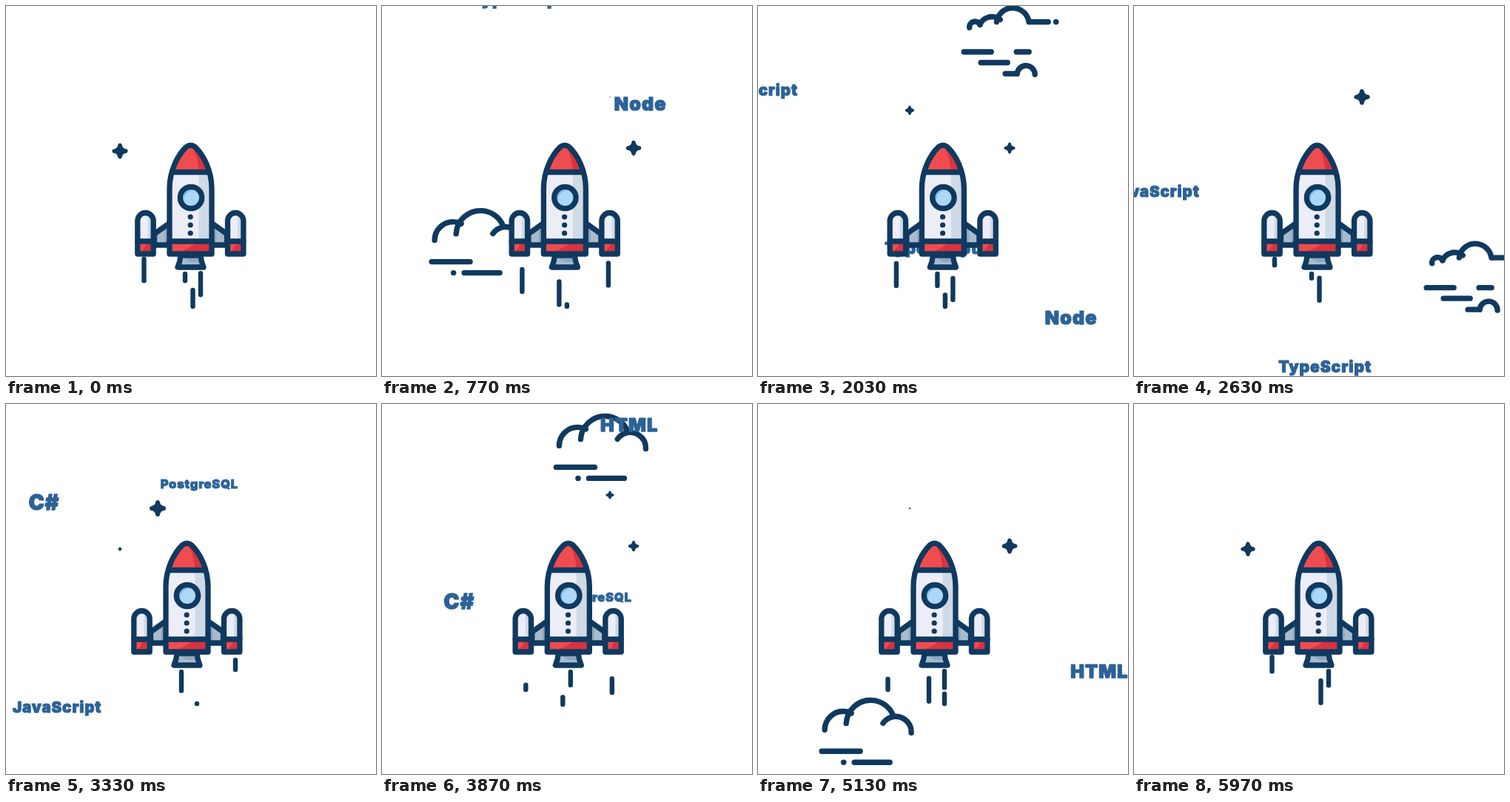
An HTML page with a canvas for the animation above (6010 ms loop, 500x500 px).

```html
<!DOCTYPE html>
<html lang="en">
<head>
<meta charset="utf-8">
<title>Rocket</title>
<style>
html, body { margin: 0; width: 100%; height: 100%; overflow: hidden; background: #fff; }
canvas { display: block; width: 500px; height: 500px; }
</style>
</head>
<body>
<canvas id="stage"></canvas>
<script>
const LOOP = 6010;
const PUFF = LOOP / 6;      // exhaust cycle
const TWINKLE = LOOP / 4;   // star cycle
const NAVY = '#10395f', BLUE = '#2c6297', RED = '#f04c4f', DARK_RED = '#d9333f';
const WHITE = '#ecedf7', SHADE = '#cedae6', STEEL = '#a8bbce', DARK_STEEL = '#8fa7be';

const canvas = document.getElementById('stage');
const ratio = window.devicePixelRatio || 1;
canvas.width = canvas.height = 500 * ratio;
const ctx = canvas.getContext('2d');

const mod = (a, n) => ((a % n) + n) % n;

function pen(width, color = NAVY) {
  ctx.lineWidth = width;
  ctx.strokeStyle = color;
  ctx.lineCap = ctx.lineJoin = 'round';
}

function line(x1, y1, x2, y2) {
  ctx.beginPath();
  ctx.moveTo(x1, y1);
  ctx.lineTo(x2, y2);
  ctx.stroke();
}

function dot(x, y) {
  line(x, y, x + 0.1, y);
}

function arc(x, y, r, from, to) {
  ctx.beginPath();
  ctx.arc(x, y, r, from * Math.PI / 180, to * Math.PI / 180);
  ctx.stroke();
}

function disc(x, y, r, color) {
  ctx.beginPath();
  ctx.arc(x, y, r, 0, 7);
  ctx.fillStyle = color;
  ctx.fill();
}

function box(x, y, w, h, color) {
  ctx.fillStyle = color;
  ctx.fillRect(x, y, w, h);
}

function fill(path, color) {
  ctx.fillStyle = color;
  ctx.fill(new Path2D(path));
}

function at(x, y, draw) {
  ctx.save();
  ctx.translate(x, y);
  draw();
  ctx.restore();
}

// paints inside a shape, then strokes its outline
function shape(outline, paint) {
  const path = new Path2D(outline);
  ctx.save();
  ctx.clip(path);
  paint();
  ctx.restore();
  ctx.stroke(path);
}

function bigCloud() {
  arc(29, 41, 25, 180, 296);
  arc(66, 34, 33, 183, 337);
  arc(100, 44, 21, 215, 363);
  line(0, 70, 52, 70);
  dot(29.5, 85);
  line(44, 85, 92, 85);
}

function smallCloud() {
  arc(15, 28, 7.5, 175, 335);
  arc(38, 32, 18, 205, 308);
  arc(66, 24, 22, 188, 352);
  line(89, 21, 114, 21);
  dot(124.5, 21);
  line(0, 61.5, 37, 61.5);
  line(71, 61.5, 88, 61.5);
  line(23, 76, 59, 76);
  line(56, 91, 72, 91);
  arc(84, 92, 12, 185, 360);
}

// the cloud's first line starts at x when its top edge enters the stage
function fallCloud(t, start, x, vx, draw) {
  const age = t - start;
  pen(7.4);
  at(x + vx * age, 0.531 * age, draw);
}

function drawClouds(t) {
  fallCloud(t, 252, 23.5, 0.084, bigCloud);
  fallCloud(t, 2030, 278, 0.195, smallCloud);
  fallCloud(t, 3842, 233, 0.084, bigCloud);
  fallCloud(t, 4379, 23, 0.084, bigCloud);
}

// x is the centre when the baseline enters the stage
function fallWord(t, text, size, start, x, vx, vy) {
  const age = t - start;
  ctx.font = `900 ${size}px Inter, sans-serif`;
  ctx.letterSpacing = size * 0.045 + 'px';
  ctx.textAlign = 'center';
  ctx.fillStyle = BLUE;
  pen(size * 0.05, BLUE);
  ctx.fillText(text, x + vx * age, vy * age);
  ctx.strokeText(text, x + vx * age, vy * age);
}

function drawWords(t) {
  fallWord(t, 'Node', 25, 155, 313, 0.0587, 0.229);
  fallWord(t, 'TypeScript', 21, 776, 184, 0.04, 0.267);
  fallWord(t, 'JavaScript', 20.5, 1500, -37, 0.058, 0.228);
  fallWord(t, 'C#', 28, 2753, -5, 0.098, 0.248);
  fallWord(t, 'PostgreSQL', 16.5, 2927, 243.5, 0.044, 0.283);
  fallWord(t, 'HTML', 25, 3731, 320, 0.101, 0.264);
}

function drawStar(t, x, y, phase) {
  const u = mod(t - phase * TWINKLE, TWINKLE) / 635;
  if (u >= 1) return;
  at(x, y, () => {
    const s = Math.sin(Math.PI * u);
    ctx.scale(s, s);
    pen(6);
    ctx.beginPath();
    ctx.moveTo(8, 0);
    for (let i = 1; i <= 4; i++) {
      const a = i * Math.PI / 2, mid = a - Math.PI / 4;
      ctx.quadraticCurveTo(1.5 * Math.cos(mid), 1.5 * Math.sin(mid), 8 * Math.cos(a), 8 * Math.sin(a));
    }
    ctx.fillStyle = NAVY;
    ctx.fill();
    ctx.stroke();
  });
}

function drawStars(t) {
  drawStar(t, 205, 141, 0.01);
  drawStar(t, 340, 192, 0.25);
  drawStar(t, 308, 123, 0.505);
  drawStar(t, 154, 196, 0.83);
}

// a dash slides down a 50px slot below the engine, once per cycle for each phase
function exhaust(t, x, top, length, ...phases) {
  for (const phase of phases) {
    const head = 0.25 * mod(t - phase * PUFF, PUFF);
    const a = Math.max(head - length, 0) + 3;
    const b = Math.min(head, 50) - 3;
    if (b >= a) line(x, top + a, x, top + b);
  }
}

function drawExhaust(t) {
  pen(6.4);
  exhaust(t, -63, 339, 36, 0.86);
  exhaust(t, -57.5, 339, 36, 0.57);
  exhaust(t, -7.5, 359, 37, 0.2, 0.58, 0.94);
  exhaust(t, 3, 359, 36, 0.46, 0.77);
  exhaust(t, 13.5, 358, 35, 0.01, 0.86);
  exhaust(t, 59, 343, 36, 0.62);
  exhaust(t, 65.5, 343, 24, 0.25);
}

function drawBooster(x) {
  at(x, 0, () => {
    shape('M-10.7 335V290.5a10.7 11 0 0 1 21.4 0V335Z', () => {
      box(-12, 276, 24, 60, WHITE);
      box(3, 276, 9, 60, SHADE);
      box(-12, 318, 24, 18, RED);
      fill('M-8 336L4 318H13V336Z', DARK_RED);
    });
    line(-10.7, 318, 10.7, 318);
  });
}

function drawWing(side) {
  ctx.save();
  ctx.scale(side, 1);
  shape('M28 293L49 308V323H28Z', () => {
    box(25, 290, 26, 35, STEEL);
    box(25, 290, 10, 35, DARK_STEEL);
  });
  ctx.restore();
}

function drawWindow() {
  disc(0.5, 259, 14.5, '#77bdea');
  ctx.save();
  ctx.clip();
  disc(4, 262, 13, '#acd7f7');
  ctx.restore();
  arc(0.5, 259, 14.7, 0, 360);
}

function drawRocket() {
  pen(7.3);
  drawWing(-1);
  drawWing(1);

  shape('M-13.5 337Q-14 345-17.5 353H17.5Q14 345 13.5 337Z', () => {
    box(-20, 335, 40, 20, STEEL);
    fill('M-14 335H14L18 346H2Q-4 346-14 335Z', DARK_STEEL);
  });

  shape('M-28.5 335V247C-28.5 222-17 201-6 190.5Q0 186 6 190.5C17 201 28.5 222 28.5 247V335Z', () => {
    box(-30, 224, 60, 94, WHITE);
    box(11, 224, 20, 94, SHADE);
    box(-30, 184, 60, 40, RED);
    fill('M-1 184Q10 203 11 224H32V184Z', DARK_RED);
    box(-30, 318, 60, 18, RED);
    fill('M-25 336Q-5 330 11 318H30V336Z', DARK_RED);
  });
  line(-24, 224.5, 24, 224.5);
  line(-28.5, 318, 28.5, 318);

  drawWindow();
  for (let i = 0; i < 3; i++) disc(-0.3, 285 + 11 * i, 3.6, NAVY);
  drawBooster(-61);
  drawBooster(60.7);
}

// turning points of the sideways drift: time, x
const turns = [[0, 0], [770, -2.6], [2030, 0.4], [3330, -5], [4330, 8], [5130, -11], [5970, 0], [LOOP, 0]];

function drift(t) {
  const i = turns.findIndex(p => p[0] > t);
  const [t1, x1] = turns[i - 1], [t2, x2] = turns[i];
  return x1 + (x2 - x1) * (1 - Math.cos(Math.PI * (t - t1) / (t2 - t1))) / 2;
}

function draw(t) {
  ctx.setTransform(ratio, 0, 0, ratio, 0, 0);
  box(0, 0, 500, 500, '#fff');
  drawClouds(t);
  drawWords(t);
  drawStars(t);
  at(249.5 + drift(t), 0, () => {
    drawExhaust(t);
    drawRocket();
  });
}

const begin = performance.now();
function tick() {
  draw(mod(performance.now() - begin, LOOP));
  requestAnimationFrame(tick);
}
tick();
</script>
</body>
</html>
```
